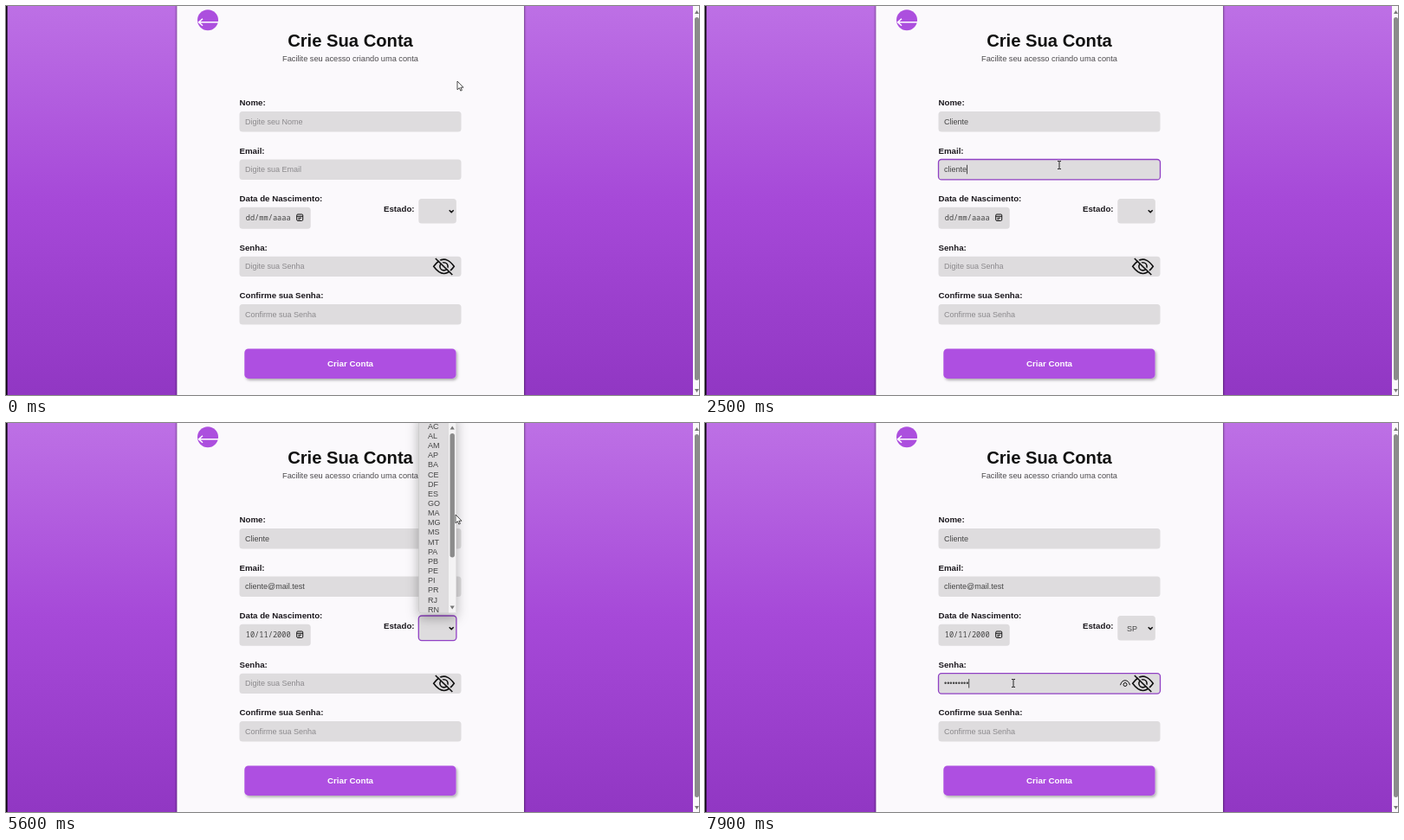
Animation, 800 px wide and 450 px high, one loop 8000 ms. Source, as an HTML page:

```html
<!DOCTYPE html>
<html lang="pt-BR">
<head>
<meta charset="utf-8">
<title>Crie Sua Conta</title>
<style>
  html, body { margin: 0; width: 100%; height: 100%; overflow: hidden; }
  svg { display: block; width: 100%; height: 100%; font: 9px "Liberation Sans", Arial, sans-serif; }
  .label { font-size: 9.7px; font-weight: bold; fill: #1b181d; }
  .field { fill: #dedcde; }
  .focus { stroke: #9040c4; stroke-width: 1.3; }
  .value { fill: #444; }
  .empty { fill: #8b898c; }
  .mono { font: 8.67px "Noto Sans Mono", "DejaVu Sans Mono", monospace; }
  .line { fill: none; stroke: #111; }
</style>
</head>
<body>
<svg id="stage" viewBox="0 0 800 450" preserveAspectRatio="none">
  <defs>
    <linearGradient id="purple" x2="0" y2="1">
      <stop offset="0" stop-color="#bd70e5"/>
      <stop offset=".5" stop-color="#a649d8"/>
      <stop offset="1" stop-color="#9137c3"/>
    </linearGradient>
    <filter id="cardShadow" x="-5%" width="110%"><feDropShadow dx="0" dy="0" stdDeviation="1.5" flood-color="#000" flood-opacity=".75"/></filter>
    <filter id="buttonShadow" x="-5%" width="110%" y="-20%" height="150%"><feDropShadow dx="1.5" dy="2" stdDeviation="1.5" flood-color="#000" flood-opacity=".3"/></filter>
    <filter id="popupShadow" x="-60%" width="220%" y="-10%" height="125%"><feDropShadow dx="0" dy="5" stdDeviation="7" flood-color="#000" flood-opacity=".3"/></filter>
    <clipPath id="popupClip"><rect x="477" y="-10" width="34" height="229.5"/></clipPath>
  </defs>

  <rect width="800" height="450" fill="url(#purple)"/>
  <rect width="1.6" height="450" fill="#0d0710"/>
  <rect x="197.5" y="-10" width="400.5" height="470" fill="#fbf9fc" filter="url(#cardShadow)"/>
  <rect x="793" width="7" height="450" fill="#faf8fb"/>
  <rect x="795" y="13" width="5" height="420" rx="2.5" fill="#8b8b8b"/>
  <path d="M795 9l2.5-4 2.5 4zM795 443l2.5 4 2.5-4z" fill="#777"/>

  <circle cx="233" cy="16.3" r="12" fill="#ac4fde"/>
  <path d="M245 18.8H222.5M227 14.8l-4.5 4 4.5 4" fill="none" stroke="#fff" stroke-width="1.5"/>
  <text x="397.5" y="47" text-anchor="middle" font-size="20.2" font-weight="bold" fill="#111">Crie Sua Conta</text>
  <text x="397.5" y="64.2" text-anchor="middle" font-size="9.23" fill="#4a484b">Facilite seu acesso criando uma conta</text>

  <g id="form"></g>

  <g class="line">
    <rect x="335.7" y="241" width="7" height="7.4" rx="1.2"/>
    <path d="M335.7 243.3h7M337.4 245.2h3.6M337.4 246.8h2"/>
    <path d="M511.7 236.2l2.5 2.4 2.5-2.4" stroke-width="1.5"/>
  </g>
  <text id="state" class="value" x="487" y="240.7"></text>

  <g class="line" stroke-width="1.6">
    <path d="M493.7 301.3Q505.5 285 517.3 301.3Q505.5 317.6 493.7 301.3Z"/>
    <circle cx="505.5" cy="301.3" r="4.6"/>
    <path d="M497.2 291.3l19 19" stroke="#dedcde"/>
    <path d="M495.8 292l19.5 19"/>
  </g>
  <g id="reveal" class="line" stroke="#333">
    <path d="M479.5 303.2Q481 297.8 485 297.8T490.5 303.2"/>
    <circle cx="485" cy="302.5" r="2"/>
  </g>

  <rect x="275.3" y="396.4" width="244.2" height="34.5" rx="4.5" fill="#ae50e1" filter="url(#buttonShadow)"/>
  <text x="397.5" y="416.8" text-anchor="middle" font-size="9.75" font-weight="bold" fill="#fff">Criar Conta</text>

  <rect id="caret" width=".8" height="10.5" fill="#222"/>

  <g id="popup">
    <rect x="476.5" y="-10" width="43.2" height="230" rx="3" fill="#dedcde" stroke="#bbb" stroke-width=".5" filter="url(#popupShadow)"/>
    <path d="M511 0h8.5v219.5h-8.5z" fill="#f4f3f4"/>
    <path d="M512.6 7.5l2.6-4 2.6 4zM512.6 211.5l2.6 4 2.6-4z" fill="#777"/>
    <rect id="thumb" x="512.5" width="5.4" height="143.5" rx="2.7" fill="#8b8b8b"/>
    <g clip-path="url(#popupClip)"><g id="options"></g></g>
  </g>

  <path id="arrow" d="M0 0V9.8L2.3 7.7 3.8 11.1 5.4 10.4 3.9 7.2H7Z" fill="#fff" stroke="#222" stroke-width=".8"/>
  <path id="beam" d="M-2-4.5h1.6L0-4 .4-4.5H2M0-4V4M-2 4.5h1.6L0 4l.4.5H2" class="line" stroke-width=".9"/>
</svg>
<script>
const LOOP = 8000, STEP = 100;
const $ = id => document.getElementById(id);

function add(parent, tag, attrs, text = '') {
  const node = document.createElementNS('http://www.w3.org/2000/svg', tag);
  for (const key in attrs) node.setAttribute(key, attrs[key]);
  node.textContent = text;
  return parent.appendChild(node);
}

const label = (x, y, text) => add($('form'), 'text', { x, y, class: 'label' }, text);
const box = (x, y, width, height) =>
  add($('form'), 'rect', { x, y, width, height, rx: 3.5, class: 'field' });

function textField(top, title, hint) {
  label(269.5, top - 6.8, title);
  const rect = box(269.5, top, 256, 23.4);
  const text = add($('form'), 'text', { x: 276, y: top + 14.7 });
  return { rect, text, hint, top };
}

const name = textField(122, 'Nome:', 'Digite seu Nome');
const email = textField(177.5, 'Email:', 'Digite sua Email');
const password = textField(289.7, 'Senha:', 'Digite sua Senha');
const confirm = textField(345, 'Confirme sua Senha:', 'Confirme sua Senha');

label(269.5, 226.2, 'Data de Nascimento:');
label(436, 238.3, 'Estado:');
const date = { rect: box(269.5, 232.7, 82.2, 25) };
const state = { rect: box(476.3, 223, 43.6, 28.6) };
const fields = [name, email, date, state, password];

const CHAR = 5.2;
const dateMark = add($('form'), 'rect', { y: 239.3, height: 11.8, fill: '#0078d7' });
const dateParts = [['dd', 0, '10'], ['mm', 3, '11'], ['aaaa', 6, '2000']].map(([hint, at, value]) => ({
  hint, at, value,
  text: add($('form'), 'text', { x: 276.7 + at * CHAR, y: 248.2, class: 'mono' })
}));
for (const at of [2, 5])
  add($('form'), 'text', { x: 276.7 + at * CHAR, y: 248.2, class: 'mono value' }, '/');

const states = 'AC AL AM AP BA CE DF ES GO MA MG MS MT PA PB PE PI PR RJ RN RO RR RS SC SE SP TO'.split(' ');
const ROW = 11.16, SCROLL = 79.7;
const optionMark = add($('options'), 'rect', { x: 477, width: 34, height: ROW, fill: '#6c6a6d' });
const options = states.map((text, i) =>
  add($('options'), 'text', { x: 487, y: 6.7 + i * ROW }, text));

// Pointer stops: time, x, y
const path = [
  [0, 521, 87], [100, 521, 87], [500, 440, 132], [1200, 440, 132], [1500, 423, 149],
  [1750, 409, 184], [3100, 409, 184], [3450, 287, 240], [4700, 287, 240],
  [5050, 502, 238], [5200, 502, 238], [5500, 519, 106], [5600, 519, 106], [5900, 519, 157],
  [6250, 497, 204], [6450, 497, 204], [6800, 356, 301], [8000, 356, 301]
];

const progress = (t, from, to) => Math.max(0, Math.min(1, (t - from) / (to - from)));
const ease = p => p * p * (3 - 2 * p);
const typed = (text, t, from, to) => text.slice(0, Math.floor(progress(t, from, to) * text.length + 1e-6));
const show = (node, on) => node.setAttribute('visibility', on ? 'visible' : 'hidden');

function pointerAt(t) {
  const i = Math.max(1, path.findIndex(stop => stop[0] >= t));
  const [t0, x0, y0] = path[i - 1], [t1, x1, y1] = path[i];
  const p = ease(progress(t, t0, t1));
  return [x0 + (x1 - x0) * p, y0 + (y1 - y0) * p];
}

function setText(field, value) {
  field.text.textContent = value || field.hint;
  field.text.setAttribute('class', value ? 'value' : 'empty');
  field.value = value;
}

function focusAt(t) {
  if (t < 600) return null;
  if (t < 1800) return name;
  if (t < 3500) return email;
  if (t < 5100) return date;
  if (t < 6400) return state;
  return t < 6900 ? null : password;
}

function drawDate(t, focused) {
  const digits = typed('10112000', t, 3500, 4700);
  const active = digits.length < 2 ? 0 : digits.length < 4 ? 1 : 2;
  show(dateMark, focused);
  dateParts.forEach((part, i) => {
    const start = i * 2, own = digits.slice(start, start + part.value.length);
    const on = focused && i === active;
    part.text.textContent = own ? own.padStart(part.value.length, '0') : part.hint;
    part.text.setAttribute('class', 'mono value');
    part.text.style.fill = on ? '#fff' : '';
    if (on) {
      dateMark.setAttribute('x', 276.5 + part.at * CHAR);
      dateMark.setAttribute('width', part.hint.length * CHAR + .4);
    }
  });
}

function drawPopup(t, y) {
  const scroll = progress(t, 5600, 5900);
  const p = ease(scroll);
  show($('popup'), t >= 5100 && t < 6400);
  $('thumb').setAttribute('y', 12 + 51 * p);
  $('options').setAttribute('transform', `translate(0 ${-SCROLL * p})`);
  const hover = t >= 6100 && t < 6400 ? Math.floor((y + SCROLL * p + 2) / ROW) : -1;
  optionMark.setAttribute('y', hover * ROW - 1.9);
  optionMark.setAttribute('opacity', hover < 0 ? 0 : 1);
  options.forEach((node, i) => node.setAttribute('fill', i === hover ? '#fff' : '#444'));
}

function draw(t) {
  const focus = focusAt(t);
  const [x, y] = pointerAt(t);
  setText(name, typed('Cliente', t, 700, 1400));
  setText(email, t < 2600 ? typed('cliente', t, 1800, 2450)
    : 'cliente' + typed('@mail.test', t, 2550, 3200));
  setText(password, typed('•••••••••', t, 6950, 7800));
  setText(confirm, '');
  fields.forEach(field => field.rect.setAttribute('class', field === focus ? 'field focus' : 'field'));
  drawDate(t, focus === date);
  drawPopup(t, y);
  $('state').textContent = t >= 6400 ? 'SP' : '';
  show($('reveal'), password.value);

  const writing = focus && focus.text;
  show($('caret'), writing);
  if (writing) {
    const width = focus.value ? focus.text.getComputedTextLength() : 0;
    $('caret').setAttribute('x', 276 + width);
    $('caret').setAttribute('y', focus.top + 6.3);
  }

  const overText = t < 6400 && t >= 5100 ? false : [name, email, password].some(field =>
    x > 269 && x < 525 && y > field.top && y < field.top + 23.4);
  show($('arrow'), !overText);
  show($('beam'), overText);
  for (const id of ['arrow', 'beam']) $(id).setAttribute('transform', `translate(${x} ${y})`);
}

const start = performance.now();
function tick() {
  const t = (performance.now() - start) % LOOP;
  draw(Math.floor(t / STEP) * STEP);
  requestAnimationFrame(tick);
}
tick();
</script>
</body>
</html>
```
